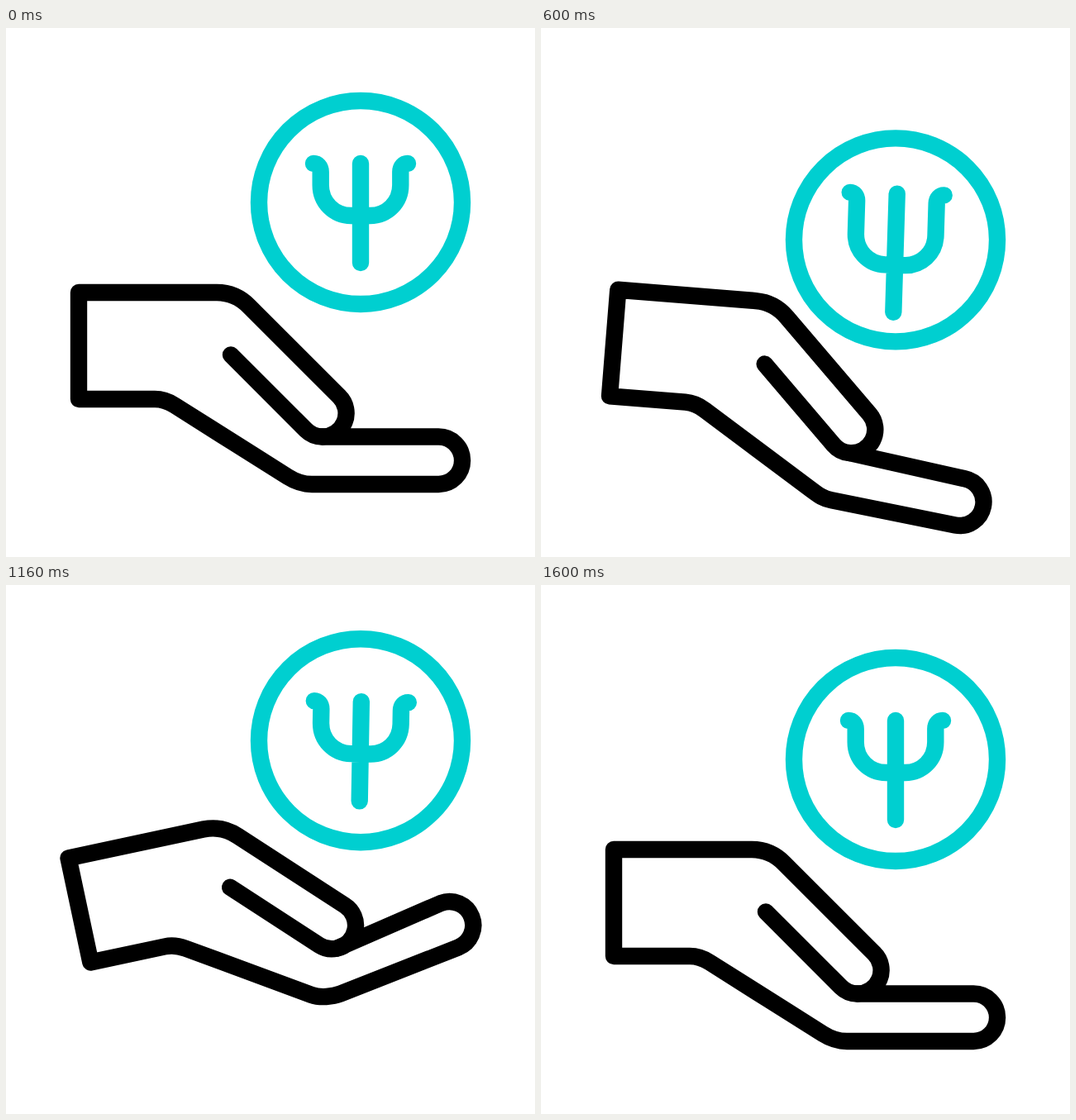
Write an HTML page that moves like this. It is 640 by 640 pixels and loops after 1640 ms.

```html
<!DOCTYPE html>
<html lang="en">
<head>
<meta charset="utf-8">
<title>Hand and coin</title>
<style>
  html, body { margin: 0; width: 100%; height: 100%; overflow: hidden; background: #fff; }
  svg { display: block; width: 100%; height: 100%; }
  path, circle { fill: none; stroke-width: 20.4; stroke-linecap: round; stroke-linejoin: round; }
  #hand { stroke: #000; }
  #coin { stroke: #00cfd0; }
</style>
</head>
<body>
<svg viewBox="0 0 640 640">
  <g id="hand">
    <path id="outline"/>
    <path d="M272 395.4 L362.8 486.2 A28.5 28.5 0 0 0 383 494.5"/>
  </g>
  <g id="coin">
    <circle r="123"/>
    <path id="psi"/>
  </g>
</svg>
<script>
const LOOP = 1640, STEP = 40;
const el = id => document.getElementById(id);
const hand = el('hand'), outline = el('outline'), coin = el('coin'), psi = el('psi');

// Smooth rise from 0 to 1 between times a and b.
function ease(t, a, b) {
  const x = Math.min(1, Math.max(0, (t - a) / (b - a)));
  return x * x * (3 - 2 * x);
}
// Rise over a..b, hold, fall over c..d.
const pulse = (t, a, b, c, d) => ease(t, a, b) - ease(t, c, d);
// Rise to a peak at b and fall again at once.
const swell = (t, a, b, c) => pulse(t, a, b, b, c);
const rad = deg => deg * Math.PI / 180;

// The wrist turns the whole hand; the fingers also bend around their joint.
function drawHand(t) {
  const low = pulse(t, 50, 450, 531, 938);
  const high = pulse(t, 531, 938, 1112, 1412);
  const blend = (fn, a, b, rest) => rest + low * (fn(rad(a)) - rest) + high * (fn(rad(b)) - rest);
  const cos = blend(Math.cos, 8.2, -10.2, 1);
  const sin = blend(Math.sin, 8.2, -10.2, 0);
  const bend = (x, y) => {
    const dx = x - 356, dy = y - 516;
    return `${356 + dx * cos - dy * sin} ${516 + dx * sin + dy * cos}`;
  };
  outline.setAttribute('d',
    'M88 320 H255 A55 55 0 0 1 294 336.6 L403.2 445.8 A28.5 28.5 0 0 1 383 494.5 ' +
    `L${bend(523.3, 494.5)} A28 28 0 0 1 ${bend(523.3, 552)} L${bend(370, 552)} ` +
    `C${bend(360.2, 552)} 350.5 549 341 543 L204 456.5 Q192 449 180 449 H88 Z`);
  hand.setAttribute('transform', `rotate(${6 * low - 12.9 * high} 131 384.5)`);
}

// The coin sinks, is tossed up and settles; the sign inside sways and stretches.
function drawCoin(t) {
  const y = 211 + 45.5 * ease(t, 90, 615) - 69 * ease(t, 615, 1050) + 23.5 * ease(t, 1110, 1600);
  const sway = 4 * swell(t, 80, 540, 770) - 9.3 * swell(t, 540, 770, 1030) + 2.3 * swell(t, 770, 1030, 1270);
  const ext = 24 * swell(t, 200, 650, 1190);
  const up = -0.38 * ext, down = 0.62 * ext;
  const top = -47 + up, bowl = -21 + down, base = 16 + down;
  const arm = side => {
    const x = 48.3 * side;
    return `M${57 * side} ${top} C${52 * side} ${top} ${x} ${top + 4} ${x} ${top + 10} V${bowl} ` +
      `C${x} ${bowl + 21} ${32 * side} ${base} ${11.5 * side} ${base} H0 `;
  };
  psi.setAttribute('d', `M0 ${top} V${73 + down} ` + arm(-1) + arm(1));
  psi.setAttribute('transform', `rotate(${sway})`);
  coin.setAttribute('transform', `translate(429 ${y})`);
}

function draw(ms) {
  const t = Math.floor((ms % LOOP) / STEP) * STEP;
  drawHand(t);
  drawCoin(t);
}

let start;
function tick(now) {
  if (start === undefined) start = now;
  draw(now - start);
  requestAnimationFrame(tick);
}
draw(0);
requestAnimationFrame(tick);
</script>
</body>
</html>
```
